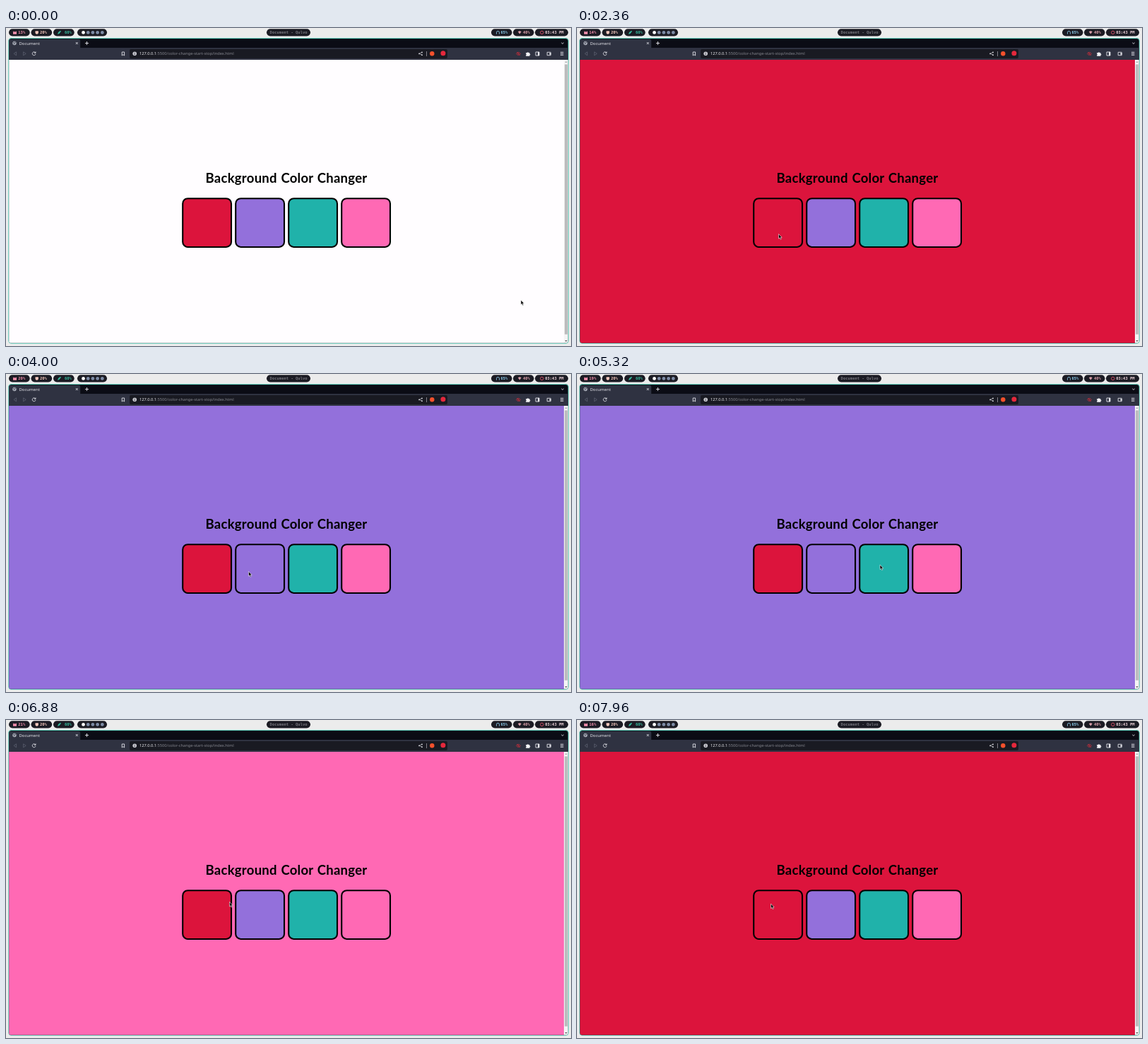
Recreate the animation shown at these times as an HTML page. Size 800 by 450 pixels, loop 8000 ms.

```html
<!DOCTYPE html>
<html lang="en">
<head>
<meta charset="utf-8">
<title>Background Color Changer</title>
<style>
html, body { margin: 0; width: 100%; height: 100%; overflow: hidden; background: #ececec; }
svg { display: block; width: 800px; height: 450px; }
.mono { font: bold 5.5px "DejaVu Sans Mono", monospace; }
.ui { font: 6px "Noto Sans", sans-serif; }
.url { font-size: 5.68px; }
.title { font: bold 18.5px Lato, sans-serif; letter-spacing: .27px; word-spacing: .8px; }
.line { fill: none; stroke: #e4e4ea; stroke-width: .9; }
</style>
</head>
<body>
<svg viewBox="0 0 800 450">
  <rect width="800" height="450" fill="#ececec"/>

  <g id="pills" fill="#1b1b23"></g>
  <g class="mono">
    <g fill="#f28fad"><path d="M10 4.2v4.6h5V4.2l-1.6 1.6-.9-1.2-.9 1.2z"/><text id="cpu" x="17.3" y="8.4"></text></g>
    <g fill="#f5c8bd"><path d="M41.5 4.3h4.4v2.2a2.2 2.2 0 0 1-4.4 0z"/><text x="48" y="8.4">20%</text></g>
    <g fill="#35b79a"><path d="M73 9l1-3 3-2.3 1 1-2.4 3z"/><text x="83" y="8.4">60%</text></g>
    <text x="373.6" y="8.4" fill="#73737b">Document - Qulvo</text>
    <g fill="#89c8e8"><path d="M694.5 8.6V6.4a2 2 0 0 1 4 0v2.2" fill="none" stroke="#89c8e8" stroke-width=".9"/><text x="700.4" y="8.4">65%</text></g>
    <g fill="#dba0aa"><path d="M724.9 5.2q2.4-1.8 4.8 0l-2.4 3.4z"/><text x="732" y="8.4">40%</text></g>
    <circle cx="758.8" cy="6.4" r="2.2" fill="none" stroke="#e0526d" stroke-width=".9"/>
    <text x="763.2" y="8.4" fill="#f0d5dc">03:43 PM</text>
  </g>
  <g id="dots"></g>

  <rect x="3.75" y="14.6" width="792.5" height="431.65" rx="3.5" fill="#0b0c15" stroke="#5fe3cb" stroke-width=".9"/>
  <path d="M4.2 28V18q0-2 2-2h97q2 0 2 2v10h690.6v17H4.2z" fill="#2f3241"/>
  <circle cx="12" cy="21.5" r="2.7" fill="#a9adb8"/>
  <path d="M10.3 20.5l2 .6-1 2M12.5 19.3l1.3 1.6" stroke="#2f3241" stroke-width=".8" fill="none"/>
  <text class="ui" x="18.4" y="23.6" fill="#e2e2e8">Document</text>
  <path class="line" d="M98.8 20l3 3m0-3l-3 3M112 21.5h5m-2.5-2.5v5M786.3 20.8l1.7 1.6 1.7-1.6"/>
  <path d="M14.6 33.8v5l-3.6-2.5zM24.6 33.8v5l3.6-2.5z" fill="none" stroke="#5c6070" stroke-width=".8"/>
  <path class="line" d="M41.7 35a2.4 2.4 0 1 0 .3 1.8M42 33.5v1.8h-1.9M164.2 34h3.4v5l-1.7-1.3-1.7 1.3z"/>

  <rect x="175" y="30" width="450" height="13" rx="2" fill="#191a22"/>
  <circle cx="182.2" cy="36.3" r="2.8" fill="#c9c9d0"/>
  <path d="M182.2 34.5v.8m0 .7v2" stroke="#191a22" stroke-width=".8"/>
  <text class="ui url" x="189" y="38.4" fill="#ededf0">127.0.0.1<tspan fill="#85868e">:5500/color-change-start-stop/index.html</tspan></text>
  <path class="line" style="stroke-width:.6" d="M589 34.4l-4 1.9 4 1.9"/>
  <path d="M589 34.4h0M585 36.3h0M589 38.2h0" stroke="#e4e4ea" stroke-width="1.7" stroke-linecap="round"/>
  <path d="M595.5 33v7" stroke="#9a9aa2" stroke-width=".8"/>
  <circle cx="603.3" cy="36.3" r="3.2" fill="#f4512c"/>
  <circle cx="618.9" cy="35.8" r="3.5" fill="#e5283c"/>

  <path d="M722.5 36.4q3-4 6 0-3 4-6 0zM723.5 34l4.4 4.8" fill="none" stroke="#b62e3c" stroke-width=".9"/>
  <circle cx="725.5" cy="36.4" r="1" fill="#b62e3c"/>
  <path d="M736.2 35h1.6a1.2 1.2 0 0 1 2.2 0h1.4v1.6a1 1 0 0 1 0 2v1.1h-5.2v-1.5a1 1 0 0 0 0-1.8z" fill="#f3f3f6"/>
  <path class="line" d="M750 34h5v5h-5zM766.2 34.3h5v4.4h-5zM785 34.3h4.4m-4.4 2h4.4m-4.4 2h4.4"/>
  <path d="M753 34h2v5h-2zM769.3 35.6h2.6v2h-2.6z" fill="#e4e4ea"/>

  <path id="page" d="M4.2 45H790v400.8H7q-2.8 0-2.8-2.8z"/>
  <path d="M790 45h5.8v398q0 2.8-2.8 2.8h-3z" fill="#f5f4f5"/>
  <rect x="791" y="51.5" width="4" height="382" fill="#bdbcbe"/>
  <path d="M791.4 49l1.6-2 1.6 2z" fill="#a5a5a8"/>
  <path d="M791.4 442l1.6 2 1.6-2z" fill="#555"/>

  <text class="title" x="397" y="219" text-anchor="middle">Background Color Changer</text>
  <g id="boxes" stroke="#000" stroke-width="2.1"></g>
  <path id="cursor" d="M0 0v6.6l1.5-1.3 1.1 2.4 1.2-.6-1.1-2.3h2z" fill="#0a0a0a" stroke="#fff" stroke-width=".55"/>
</svg>
<script>
const LOOP = 8000;
const [RED, PURPLE, TEAL, PINK] = ['#dc143c', '#9370db', '#20b2aa', '#ff69b4'];
const $ = id => document.getElementById(id);

function add(parent, tag, attrs) {
  const el = document.createElementNS('http://www.w3.org/2000/svg', tag);
  for (const key in attrs) el.setAttribute(key, attrs[key]);
  $(parent).append(el);
}

const pill = (x, width) => add('pills', 'rect', { x, y: 1.2, width, height: 10.2, rx: 5.1 });
for (let i = 0; i < 3; i++) {
  pill(4 + i * 31.5, 29.7);
  pill(687 + i * 31, i < 2 ? 29.5 : 47);
}
pill(101, 42);
pill(369, 62);

for (let i = 0; i < 5; i++) {
  add('dots', 'circle', { cx: 109.5 + i * 6.7, cy: 6.4, r: 2.4, fill: i ? '#7d8ba5' : '#fff' });
}
[RED, PURPLE, TEAL, PINK].forEach((fill, i) =>
  add('boxes', 'rect', { x: 250.2 + i * 75, y: 241.2, width: 68.8, height: 68.8, rx: 7.3, fill }));

const clicks = [[0, '#fffdff'], [2280, RED], [3920, PURPLE], [5360, TEAL], [6440, PINK], [7440, RED]];
const loads = [13, 10, 14, 20, 19, 18, 21, 16];

// Cursor moves: arrival time, travel time, destination
const home = [729, 385];
const moves = [
  [640, 640, 378, 429], [1120, 220, 341, 377], [1560, 300, 285.5, 291.5], [3640, 500, 343.5, 279.5],
  [5000, 260, 429, 270], [6040, 340, 499.5, 277], [7200, 560, 274.5, 260]
];

const pageColor = t => clicks.findLast(c => c[0] <= t)[1];

// The load meter refreshes about once a second
const load = t => loads[Math.max(0, Math.floor((t - 310) / 1024))];

// Each move eases out along a slight bow
function cursorAt(t) {
  let [x, y] = home;
  for (const [end, span, toX, toY] of moves) {
    const u = Math.min(1, Math.max(0, (t - end + span) / span));
    const k = 1 - (1 - u) ** 3;
    const dx = toX - x;
    x += dx * k;
    y += (toY - y) * k + .17 * dx * k * (1 - k);
    if (u < 1) break;
  }
  return [x, y];
}

function draw(now) {
  const t = now % LOOP;
  $('page').setAttribute('fill', pageColor(t));
  $('cpu').textContent = load(t) + '%';
  $('cursor').setAttribute('transform', `translate(${cursorAt(t)})`);
}

let start;
function tick(now) {
  start ??= now;
  draw(Math.max(0, now - start));
  requestAnimationFrame(tick);
}
draw(0);
requestAnimationFrame(tick);
</script>
</body>
</html>
```
